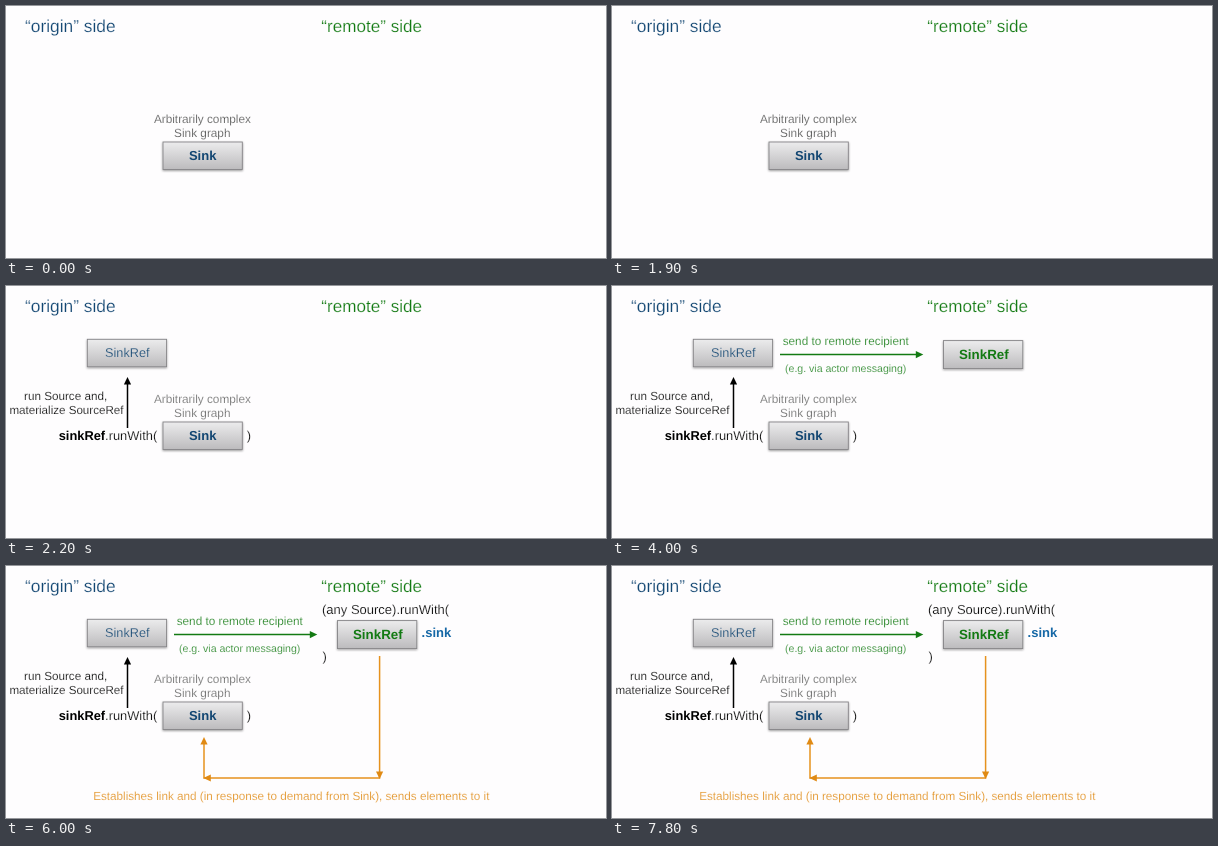
These frames come from a looping animation (600x252 px, 8 s). An HTML page:

```html
<!DOCTYPE html>
<html lang="en">
<head>
<meta charset="utf-8">
<title>SinkRef flow</title>
<style>
  html, body { margin: 0; width: 100%; height: 100%; overflow: hidden; background: #fefdfe; }
  svg { display: block; width: 100%; height: 100%; }

  text {
    font-family: "Liberation Sans", Arial, sans-serif;
    text-rendering: geometricPrecision;
    white-space: pre;
  }
  .b { font-weight: bold; }
  .m { text-anchor: middle; }
  /* a background-coloured outline slims regular glyphs to a light weight */
  .l { stroke: #fefdfe; stroke-width: .24px; }
  .on { stroke: #d8d7d8; }

  .navy { fill: #124672; }
  .green { fill: #137a13; }
  .grey { fill: #4c4c4c; animation: soften 8s step-end infinite; }
  .blue { fill: #1668a6; }
  .orange { fill: #e08a14; }

  .line { fill: none; stroke-width: 1.5; }
  .box { fill: url(#metal); stroke: #858487; stroke-width: .9; filter: url(#shade); }

  .step { visibility: hidden; animation: 8s step-end infinite; }
  .s1 { animation-name: show1; }
  .s2 { animation-name: show2; }
  .s3 { animation-name: show3; }
  @keyframes show1 { 0% { visibility: hidden; } 25%, 100% { visibility: visible; } }
  @keyframes show2 { 0% { visibility: hidden; } 50%, 100% { visibility: visible; } }
  @keyframes show3 { 0% { visibility: hidden; } 75%, 100% { visibility: visible; } }
  @keyframes soften { 0% { fill: #4c4c4c; } 25%, 100% { fill: #646464; } }
</style>
</head>
<body>
<svg viewBox="0 0 600 252" preserveAspectRatio="none">
  <defs>
    <linearGradient id="metal" x2="0" y2="1">
      <stop offset="0" stop-color="#ececed"/>
      <stop offset="1" stop-color="#bcbbbd"/>
    </linearGradient>
    <filter id="shade" x="-10%" y="-20%" width="120%" height="150%">
      <feDropShadow dx="0" dy="1" stdDeviation="1" flood-color="#000" flood-opacity=".4"/>
    </filter>
  </defs>

  <text class="l navy" x="19" y="26" font-size="17.35">“origin” side</text>
  <text class="l green" x="315.3" y="26" font-size="17.1">“remote” side</text>

  <text class="l m grey" x="196.4" y="116.5" font-size="11.8">Arbitrarily complex</text>
  <text class="l m grey" x="196.3" y="130.5" font-size="11.8">Sink graph</text>
  <rect class="box" x="157" y="136" width="79.3" height="27.5"/>
  <text class="b m navy" x="196.7" y="154.4" font-size="13">Sink</text>

  <g class="step s1">
    <rect class="box" x="81.3" y="53.3" width="79.3" height="27.5"/>
    <text class="l on m navy" x="121.3" y="71.4" font-size="12.7">SinkRef</text>
    <path class="line" stroke="#000" d="M121.5 142V96"/>
    <path d="M121.5 91l3.6 7.5h-7.2z"/>
    <text class="l" x="18" y="114.2" font-size="11.7">run Source and,</text>
    <text class="l" x="3.4" y="128.4" font-size="11.6">materialize SourceRef</text>
    <text x="52.7" y="154.4" font-size="12.85"><tspan class="b">sinkRef</tspan><tspan class="l">.runWith(</tspan></text>
    <text class="l" x="240.8" y="154.4" font-size="12.85">)</text>
  </g>

  <g class="step s2">
    <text class="l green" x="170.7" y="58.6" font-size="11.75">send to remote recipient</text>
    <text class="l green" x="173" y="86" font-size="10.55">(e.g. via actor messaging)</text>
    <path class="line" stroke="#137a13" d="M168 68.6H305"/>
    <path class="green" d="M311.3 68.6l-7.5 3.6v-7.2z"/>
    <rect class="box" x="331.5" y="54.6" width="79.3" height="28"/>
    <text class="b m green" x="371.8" y="73.3" font-size="13.35">SinkRef</text>
  </g>

  <g class="step s3">
    <text class="l" x="316" y="48" font-size="13">(any Source).runWith(</text>
    <text class="l" x="316.5" y="94.6" font-size="13">)</text>
    <text class="b blue" x="415.6" y="71" font-size="13">.sink</text>
    <path class="line" stroke="#e6921e" d="M373.6 90V212H198V176"/>
    <g class="orange">
      <path d="M373.6 213l-3.6-7.5h7.2z"/>
      <path d="M197.3 212l7.5-3.6v7.2z"/>
      <path d="M198 171l3.6 7.5h-7.2z"/>
    </g>
    <text class="l orange" x="87.2" y="233.6" font-size="11.7">Establishes link and (in response to demand from Sink), sends elements to it</text>
  </g>
</svg>
</body>
</html>
```
